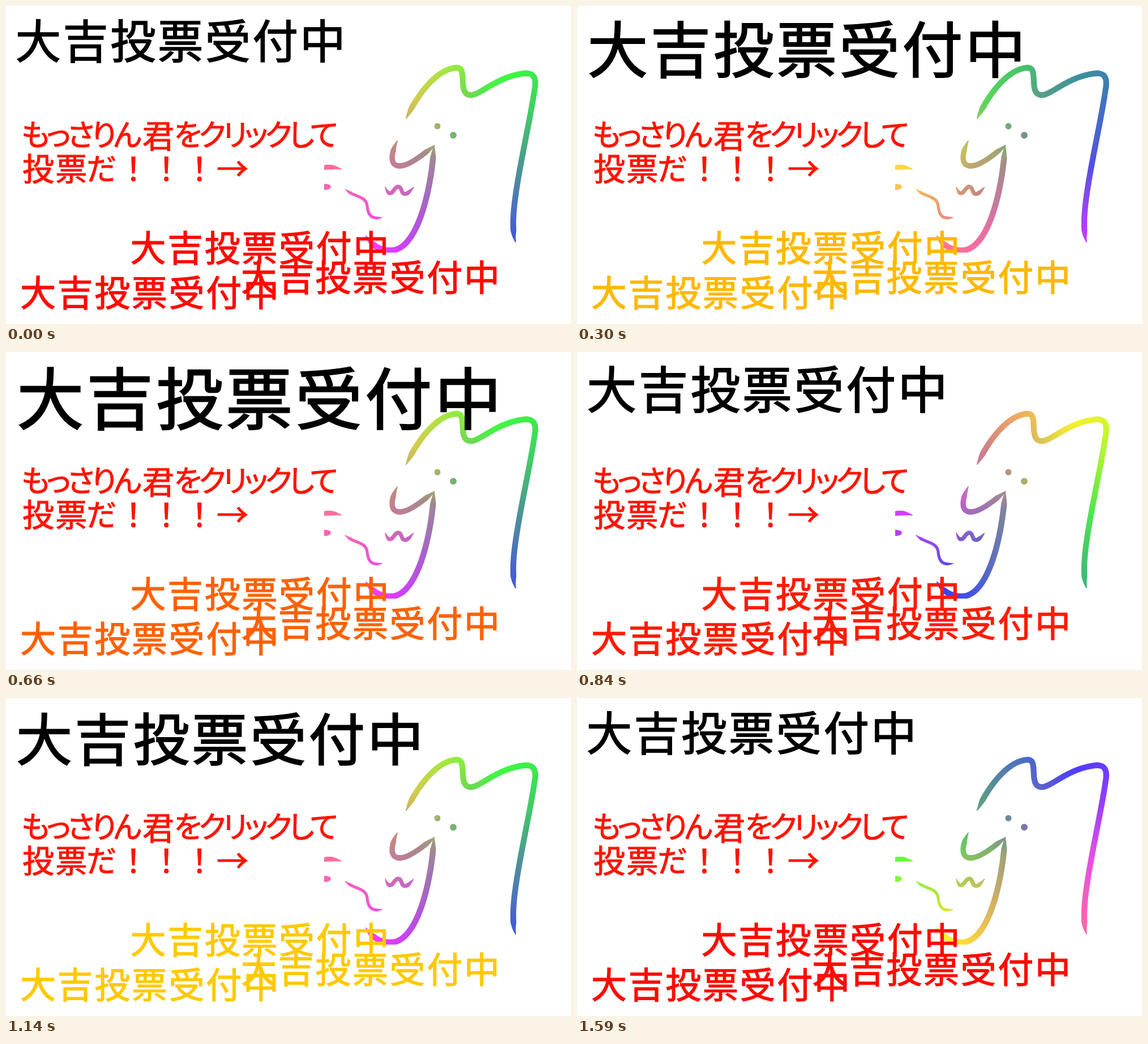
An HTML page with a canvas for the animation above (1.62 s loop, 998x561 px).

```html
<!DOCTYPE html>
<html lang="ja">
<head>
<meta charset="utf-8">
<style>
  html, body { margin: 0; width: 998px; height: 561px; overflow: hidden; background: #fff; }
  canvas, svg { position: absolute; left: 0; top: 0; }
  text {
    font-family: "Noto Sans CJK JP", "Noto Sans CJK", sans-serif;
    letter-spacing: .042em;
    fill: currentColor; stroke: currentColor; stroke-width: .02em;
  }
  .notice { color: #ff1400; font-size: 56px; }
  .kana { font-size: 53px; letter-spacing: -.1em; font-feature-settings: "palt"; }
  #banners { font-size: 63px; }
</style>
</head>
<body>
<canvas id="mascot" width="998" height="561"></canvas>
<svg width="998" height="561">
  <text id="title">大吉投票受付中</text>
  <g class="notice">
    <text class="kana" x="27" y="247">もっさりん</text>
    <text x="241" y="250">君</text>
    <text class="kana" x="297" y="247">をクリックして</text>
    <text x="29" y="308">投票</text>
    <text class="kana" x="142" y="307">だ</text>
    <text x="197" y="308">！！！→</text>
  </g>
  <g id="banners">
    <text x="219.5" y="450">大吉投票受付中</text>
    <text x="415" y="502">大吉投票受付中</text>
    <text x="25" y="529">大吉投票受付中</text>
  </g>
</svg>
<script>
const LOOP = 1620, STEP = 60, PULSE = 405, HUE_STEP = 27;
const title = document.getElementById('title');
const banners = document.getElementById('banners');
const ctx = document.getElementById('mascot').getContext('2d');

function dot(x, y, rx, ry = rx) {
  ctx.moveTo(x + rx, y);
  ctx.ellipse(x, y, rx, ry, 0, 0, 2 * Math.PI);
}

// Follows a path with a round brush that thins out towards both ends
function brush(radius, d) {
  const path = document.createElementNS('http://www.w3.org/2000/svg', 'path');
  path.setAttribute('d', d);
  const length = path.getTotalLength();
  for (let pos = 0; pos <= length; pos++) {
    const { x, y } = path.getPointAtLength(pos);
    const fromEnd = Math.min(pos, length - pos);
    dot(x, y, radius * Math.min(1, .2 + fromEnd / (5 * radius)));
  }
}

function drawShape() {
  ctx.beginPath();
  ctx.rect(562, 0, 436, 435);
  ctx.clip();
  ctx.beginPath();
  // head and back
  brush(5.2, 'M707 198C735 140 770 108 798 109C815 111 797 157 821 157C838 157 868 124 915 119' +
    'C932 117 937 127 934 145C924 215 895 330 896 385Q896 405 900 416');
  // beak, belly, mouth, arm, foot
  brush(4.8, 'M691 238C676 268 681 284 698 282S735 263 757 246');
  brush(5.3, 'M756 247C751 330 725 431 680 431C660 432 645 420 636 406');
  brush(3.5, 'M670 319Q676 338 685 325T699 326T720 319');
  brush(2.6, 'M599 323C615 338 636 334 638 353S648 376 665 373');
  brush(4.2, 'M545 289Q572 280 592 288');
  dot(562, 319, 12, 5.5);
  dot(762, 212, 5.5);
  dot(790, 228, 6);
  ctx.fill();
  ctx.globalCompositeOperation = 'source-atop';
}

// The hue wheel turns behind the shape and fades to grey at its centre
const wheel = ['#ff7884', '#fff02c', '#3cff3c', '#3c9696', '#463cff', '#ff3cff', '#ff7884'];
const centre = ctx.createRadialGradient(765, 265, 0, 765, 265, 185);
centre.addColorStop(0, 'rgba(140,145,135,.9)');
centre.addColorStop(1, 'rgba(140,145,135,0)');

function paintMascot(turn) {
  const hues = ctx.createConicGradient((60 * turn - 173) * Math.PI / 180, 765, 265);
  wheel.forEach((colour, i) => hues.addColorStop(i / 6, colour));
  for (const fill of [hues, centre]) {
    ctx.fillStyle = fill;
    ctx.fillRect(0, 0, 998, 561);
  }
}

const pingPong = (t, half) => half - Math.abs(t % (2 * half) - half);

function render(now) {
  const time = now % LOOP;
  const ended = time >= LOOP - STEP / 2;
  const t = ended ? LOOP - STEP / 2 : Math.floor(time / STEP) * STEP;
  const textTime = ended ? 0 : t;

  const pitch = 83.7 + .262 * pingPong(textTime, PULSE / 2);
  title.style.fontSize = `${.96 * pitch}px`;
  title.setAttribute('x', 12 + .058 * pitch);
  title.setAttribute('y', 17.2 + .894 * pitch);
  const green = Math.round(10 + 235 * pingPong(textTime, PULSE) / PULSE);
  banners.style.color = `rgb(255,${green},0)`;
  paintMascot(Math.floor(t / HUE_STEP) % 6);
  requestAnimationFrame(() => render(performance.now()));
}

drawShape();
render(performance.now());
</script>
</body>
</html>
```
